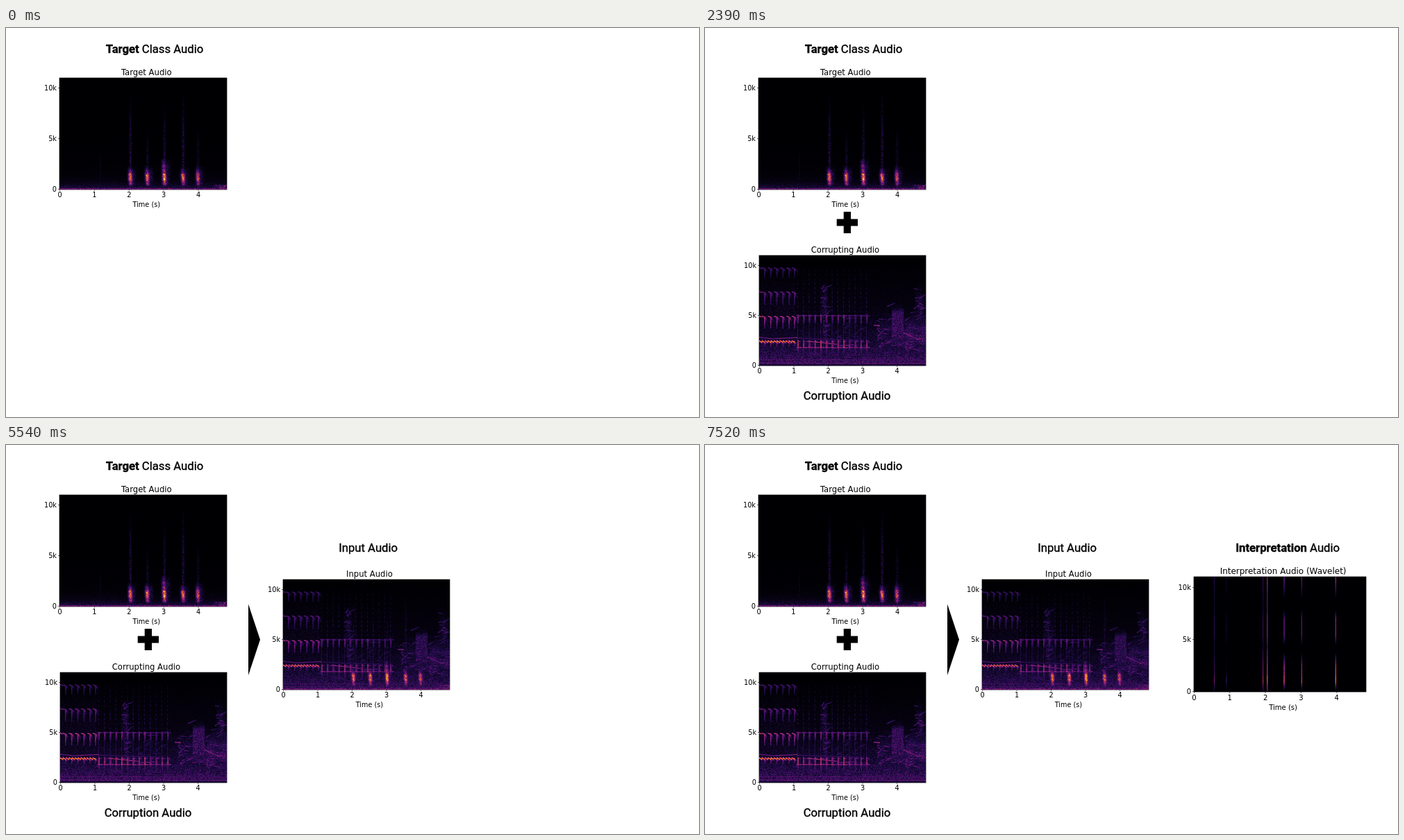
Animation, 998 px wide and 561 px high, one loop 8 s. Source, as an HTML page with a canvas:

```html
<!DOCTYPE html>
<html lang="en">
<head>
<meta charset="utf-8">
<title>Audio interpretation</title>
<style>
html, body { margin: 0; width: 100%; height: 100%; overflow: hidden; background: #fff; }
.step, .step svg { position: absolute; left: 0; top: 0; width: 998px; height: 561px; }
canvas { position: absolute; }
.head { font: 16.7px Roboto, sans-serif; stroke: #000; stroke-width: .35px; }
.head .b { font-weight: 700; }
.plot { font-family: "DejaVu Sans", sans-serif; }
</style>
</head>
<body>
<script>
const LOOP = 8000;
const INFERNO = [[0, 0, 3], [31, 12, 72], [85, 15, 109], [136, 34, 106], [186, 54, 85],
  [227, 89, 51], [249, 140, 10], [249, 201, 50], [252, 255, 164]];

function rng(seed) {
  return () => {
    seed = seed + 0x6d2b79f5 | 0;
    let n = Math.imul(seed ^ seed >>> 15, 1 | seed);
    n = n + Math.imul(n ^ n >>> 7, 61 | n) ^ n;
    return ((n ^ n >>> 14) >>> 0) / 4294967296;
  };
}
const bell = (x, s) => Math.exp(-x * x / (2 * s * s));
const ramp = (x, a, b) => Math.min(1, Math.max(0, (x - a) / (b - a)));

// Intensity grid addressed in seconds and kHz; overlapping sounds keep the louder value.
class Field {
  constructor({ w, h, sx, sy }) {
    Object.assign(this, { w, h, sx, sy, gain: 1, v: new Float32Array(w * h) });
  }
  put(x, y, a) {
    if (x < 0 || y < 0 || x >= this.w || y >= this.h) return;
    const i = y * this.w + x;
    this.v[i] = Math.max(this.v[i], a * this.gain);
  }
  each(fn) {
    for (let y = 0; y < this.h; y++)
      for (let x = 0; x < this.w; x++)
        this.put(x, y, fn((x + .5) / this.sx, (this.h - y - .5) / this.sy));
  }
  line(t0, f0, t1, f1, a, b = a) {
    const x0 = t0 * this.sx, y0 = this.h - f0 * this.sy;
    const dx = (t1 - t0) * this.sx, dy = (f0 - f1) * this.sy;
    const n = Math.ceil(Math.hypot(dx, dy) * 2) + 1;
    for (let k = 0; k <= n; k++) {
      const x = x0 + dx * k / n - .5, y = y0 + dy * k / n - .5;
      const i = Math.floor(x), j = Math.floor(y), p = x - i, q = y - j;
      const c = a + (b - a) * k / n;
      this.put(i, j, c * Math.sqrt((1 - p) * (1 - q)));
      this.put(i + 1, j, c * Math.sqrt(p * (1 - q)));
      this.put(i, j + 1, c * Math.sqrt((1 - p) * q));
      this.put(i + 1, j + 1, c * Math.sqrt(p * q));
    }
  }
  paint(ctx, grain) {
    const img = ctx.createImageData(this.w, this.h), rand = rng(5);
    this.v.forEach((v, i) => {
      const s = Math.min(.999, Math.max(0, v * (1 + (rand() - .5) * grain))) * 8;
      const k = Math.floor(s), p = s - k;
      for (let c = 0; c < 3; c++)
        img.data[i * 4 + c] = INFERNO[k][c] * (1 - p) + INFERNO[k + 1][c] * p;
      img.data[i * 4 + 3] = 255;
    });
    ctx.putImageData(img, 0, 0);
  }
}

// [time, column height, core height, loudness]
const CALLS = [[2.05, 9.3, 2.2, .68], [2.54, 6, 2.2, .66], [3.03, 8.4, 2.9, .74],
  [3.57, 9.6, 2.1, .62], [4, 6.3, 2.2, .58]];

function target(g) {
  const rand = rng(11);
  g.each((t, f) => {
    let v = .17 * Math.exp(-f / .4) * (.3 + rand()) + .03 * Math.exp(-f / 1.4) * rand();
    if (f < .13) v = .2 + .16 * rand();
    if (t > 4.4 && f < .5) v = Math.max(v, .38 * rand() * ramp(t, 4.4, 4.6));
    v = Math.max(v, .08 * bell(t - 1.18, .012) * ramp(f, 4.2, 2) * rand());
    for (const [c, top, core, a] of CALLS) {
      const d = t - c;
      if (Math.abs(d) > .3) continue;
      const r = rand();
      v = Math.max(v, .2 * bell(d, .024) * ramp(f, top, top - 5) * (.1 + r * r));
      const body = ramp(f, core + .25, core - .6) * ramp(f, .15, .5);
      const tone = .45 + .55 * bell(f - 1.2, .35) + .08 * Math.sin(f * 14);
      v = Math.max(v, a * body * tone * bell(d + .012 * (f - 1), .042) * (.75 + .5 * r));
      v = Math.max(v, .2 * body * bell(d - .06, .07) * r);
    }
    return v;
  });
}

function corruption(g) {
  const rand = rng(23);
  // background hiss and the late clouds
  g.each((t, f) => {
    const r = rand();
    let v = (.04 + .21 * Math.exp(-f / 2)) * (.3 + r) * ramp(f, 10.5, 2);
    if (f < .12) v = .08;
    if (t < 1.05) v = Math.max(v, .09 * r * ramp(f, 10, 5));
    const swell = ramp(t, 3.1, 3.25);
    const top = 4.6 + 1.1 * bell(t - 4.05, .2) + 1 * bell(t - 4.7, .15);
    const patch = .75 + .25 * Math.sin(t * 11 + f * 2.3) * Math.sin(f * 3.1 - t * 4);
    const low = .09 + .13 * bell(f - 2.8, 1) * ramp(t, 3.3, 4.4);
    v = Math.max(v, swell * ramp(f, top + 1.3, top - .8) * low * patch * (.45 + r));
    if (t > 3.85 && t < 4.2) v = Math.max(v, .17 * (.45 + r) * ramp(f, 1, 3) * ramp(f, 5.9, 5.3));
    v = Math.max(v, .15 * bell(t - 4.68, .1) * ramp(f, 8.5, 6.5) * r);
    v = Math.max(v, .2 * bell(t - 1.9, .08) * ramp(f, 8.2, 6.5) * r);
    return v;
  });
  // hooked notes with overtones
  const rows = [[9.75, .26, .9], [7.35, .36, 1.25], [4.9, .56, 1.15], [2.42, .5, .5]];
  for (const [f, a, drop] of rows) {
    g.line(0, f + .08, .07, f - .02, a);
    for (let i = 0; i < 6; i++) {
      const t = .09 + i * .178 - (i > 4 ? .02 : 0);
      g.line(t, f + .05, t + .07, f - .05, a);
      g.line(t + .06, f, t + .1, f - .2, a * .9);
      g.line(t + .06, f - .1, t + .07, f - drop, a * .8, a * .45);
      g.line(t + .09, f - .1, t + .07, f - drop * .8, a * .75, a * .4);
      g.line(t + .1, f - .05, t + .14, f - drop * .4, a * .5, a * .3);
    }
  }
  for (let i = 0; i < 12; i++) {
    const t = i * .087;
    g.line(t, 2.5, t + .08, 2.3, .82, .68);
    g.line(t, 2.42, t + .08, 2.38, .68);
  }
  g.line(0, 2.85, .4, 2.7, .34);
  g.line(.4, 2.7, 1.1, 2.82, .36);
  // pulse train
  for (let i = 0; i < 13; i++) {
    const t = 1.12 + i * .167, a = i < 9 ? 1 : .8;
    for (let f = 5.4; f < 9.6; f += .45) g.line(t, f + .25 * rand(), t, f, .13 * ramp(f, 11, 6));
    for (const d of [0, .02]) {
      g.line(t + d, 5.05, t + d, 4.3, .38 * a, .22);
      g.line(t + d, 2.5, t + d, 1.75, .44 * a, .42);
      g.line(t + d, 1.7, t + d, 1.1, .25, .16);
    }
    g.line(t, 4.2, t, 2.6, .12, .18);
    g.line(t - .02, 5.02, t + .08, 5, .34 * a);
    g.line(t - .02, 1.84, t + .1, 1.8, .48 * a);
    g.line(t + .02, 2.44, t + .08, 2.42, .34);
  }
  g.line(1.08, 5.02, 3.18, 4.98, .2);
  g.line(1.08, 1.82, 3.2, 1.8, .32);
  g.line(1.1, 2.75, 2.9, 2.55, .22);
  g.line(1.4, 2.45, 2.25, 2.15, .54, .42);
  g.line(2.35, 2, 2.75, 2.1, .44, .32);
  for (const f of [.3, .6]) g.line(0, f, 4.85, f - .05, .26);
  // short slanted voices
  const strokes = (n, t0, t1, f0, f1, a) => {
    for (let i = 0; i < n; i++) {
      const t = t0 + (t1 - t0) * rand(), f = f0 + (f1 - f0) * rand();
      const k = rand() - .35;
      g.line(t, f, t + .06 + .16 * rand(), f + k * .7, a * (.6 + .5 * rand()), a * .5);
    }
  };
  strokes(14, 1.8, 1.95, 2.8, 8, .32);
  strokes(20, 2.2, 3, 2.6, 5, .22);
  strokes(50, 3.4, 4.75, 1.6, 3.8, .36);
  strokes(16, 3.25, 4.75, 3.6, 6, .28);
  strokes(8, 4.5, 4.7, 5.5, 8.2, .34);
  strokes(40, 0, 4.6, .3, 1.7, .26);
  g.line(3.35, 4.05, 3.5, 4, .48);
  g.line(4.2, 3.3, 4.65, 2.6, .4);
}

// [time, loudness above 4 kHz, loudness below, gap depth]
const SPIKES = [[.575, .15, .18, .5], [.91, .06, .02, 1], [1.94, .18, .32, .5], [2.06, .38, .5, .35],
  [2.535, .32, .5, 1], [3.03, .3, .42, 1], [3.985, .42, .6, 1]];

function wavelet(g) {
  for (const [t, hi, lo, gap] of SPIKES)
    for (let f = .1; f < 11; f += .06) {
      const open = Math.max(ramp(f, 9, 10.6), ramp(f, 4.5, 5.4) * ramp(f, 7.8, 6.9),
        ramp(f, .1, .9) * ramp(f, 3.7, 2.4));
      const a = (f > 4 ? hi : lo + .15 * bell(f - 1.1, .35)) * (1 - gap + gap * open);
      g.line(t, f, t, f + .06, a);
    }
}

const PANELS = [
  { x: 77, y: 72, w: 241, h: 161, sx: 49.9, sy: 14.6, mid: 202.3, title: "Target Audio",
    layers: [[target, 1]] },
  { x: 78, y: 328, w: 240, h: 159, sx: 49.5, sy: 14.4, mid: 201.9, title: "Corrupting Audio",
    layers: [[corruption, 1]] },
  { x: 399, y: 194, w: 240, h: 159, sx: 49.5, sy: 14.4, mid: 523.4, title: "Input Audio",
    layers: [[corruption, .85], [target, 1]] },
  { x: 704, y: 190, w: 248, h: 166, sx: 51.3, sy: 15, mid: 832.6, title: "Interpretation Audio (Wavelet)",
    layers: [[wavelet, 1]], grain: .3 }
];
const STEPS = [
  { at: 0, extra: '<text class="head" x="143.7" y="36"><tspan class="b">Target</tspan> Class Audio</text>' },
  { at: 500, extra: '<path d="M199.7 265h10.3v10.4h10v10.2h-10v10.4h-10.3v-10.4h-10v-10.2h10z"/>' +
    '<text class="head" x="141.7" y="536">Corruption Audio</text>' },
  { at: 3650, extra: '<path d="M349 229.5L366 280.7L349 332z"/><text class="head" x="479.2" y="153.5">Input Audio</text>' },
  { at: 6800, extra: '<text class="head" x="764.2" y="153.5"><tspan class="b">Interpretation</tspan> Audio</text>' }
];

function axes({ x, y, w, h, sx, sy, mid, title }) {
  const k = w / 240, size = 9.7 * k, base = y + h;
  const label = (s, px, py, anchor, fs = size) =>
    `<text class="plot" x="${px}" y="${py}" text-anchor="${anchor}" font-size="${fs}">${s}</text>`;
  let out = `<rect x="${x}" y="${y}" width="${w}" height="${h}" stroke="#000" stroke-width=".7"/>` +
    label(title, mid, y - 3.8, "middle", 11.6 * k) + label("Time (s)", mid, base + 24.8 * k, "middle");
  for (let t = 0; t < 5; t++) {
    const px = x + .5 + t * sx;
    out += label(t, px, base + 11.4 * k, "middle") + `<path d="M${px} ${base}v2" stroke="#000" stroke-width=".5"/>`;
  }
  ["0", "5k", "10k"].forEach((s, i) => {
    const py = base - .5 - i * 5 * sy;
    out += label(s, x - 4, py + 3.5 * k, "end") + `<path d="M${x} ${py}h-2" stroke="#000" stroke-width=".6"/>`;
  });
  return out;
}

const views = STEPS.map(({ extra }, i) => {
  const p = PANELS[i], div = document.createElement("div"), cv = document.createElement("canvas");
  div.className = "step";
  div.innerHTML = `<svg viewBox="0 0 998 561">${axes(p)}${extra}</svg>`;
  cv.width = p.w;
  cv.height = p.h;
  cv.style.left = p.x + "px";
  cv.style.top = p.y + "px";
  const g = new Field(p);
  for (const [draw, gain] of p.layers) {
    g.gain = gain;
    draw(g);
  }
  g.paint(cv.getContext("2d"), p.grain || .5);
  div.append(cv);
  document.body.append(div);
  return div;
});

const start = performance.now();
function tick() {
  const t = (performance.now() - start) % LOOP;
  views.forEach((el, i) => el.style.visibility = t >= STEPS[i].at ? "visible" : "hidden");
  requestAnimationFrame(tick);
}
tick();
</script>
</body>
</html>
```
